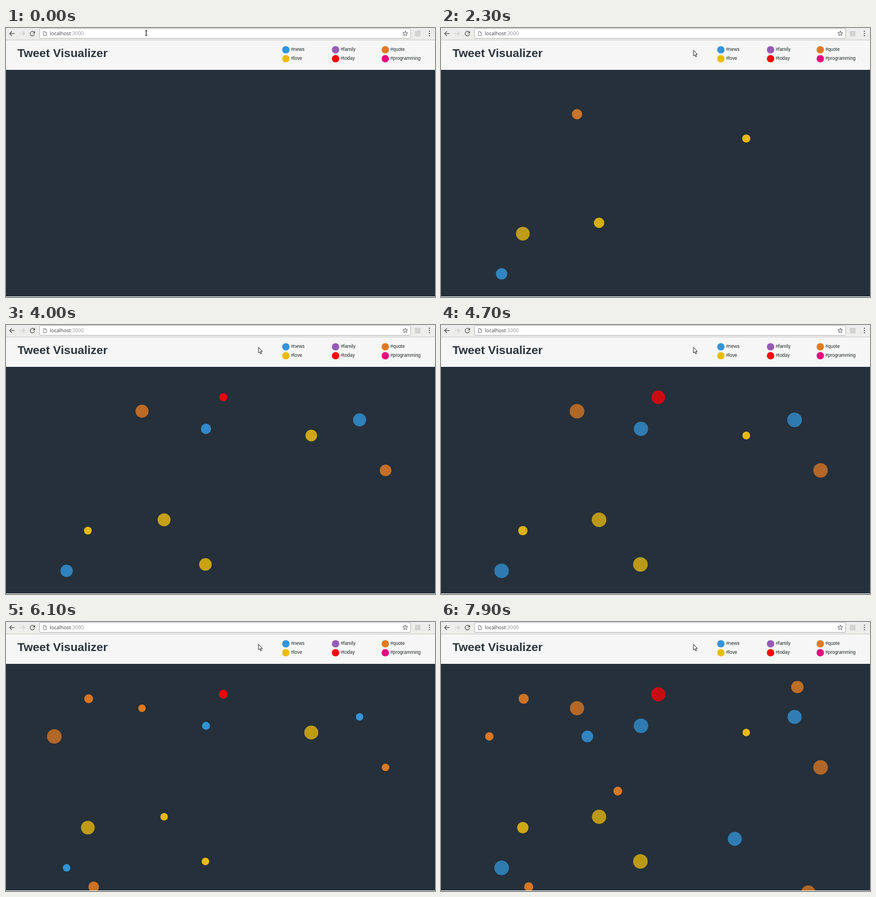
An HTML page with a canvas that plays this animation: 768x482 px, repeating every 8 s.

```html
<!DOCTYPE html>
<html lang="en">
<head>
<meta charset="utf-8">
<title>Tweet Visualizer</title>
<style>
  html, body { margin: 0; width: 100%; height: 100%; overflow: hidden; background: #fff; }
  canvas { display: block; width: 768px; height: 482px; }
</style>
</head>
<body>
<canvas id="stage" width="768" height="482"></canvas>
<script>
const ctx = document.getElementById('stage').getContext('2d');
const LOOP = 8000, STEP = 100, PULSE = 3000;
const SANS = '"Liberation Sans", Arial, sans-serif';

const colors = {
  news: '#3394d8', family: '#955bb3', quote: '#e07a22',
  love: '#ebbb0b', today: '#f80208', programming: '#e8057f'
};

// tag, x, y, time of arrival
const tweets = [
  ['quote', 243.5, 154.5, 280], ['love', 283, 349, 300], ['news', 108.5, 440.5, 400],
  ['love', 146.5, 368.5, 1420], ['love', 546.5, 198, 2130], ['news', 633, 170, 3270],
  ['love', 357, 429, 3370], ['quote', 679.5, 260.5, 3480], ['news', 358, 186, 3630],
  ['today', 389, 129.5, 3850], ['quote', 86.5, 205, 4705], ['quote', 157, 474.5, 5700],
  ['quote', 148, 137.5, 5860], ['quote', 657.5, 485, 6700], ['news', 526, 388.5, 6950],
  ['quote', 638, 116.5, 7290], ['news', 262, 205, 7380], ['quote', 316.5, 303, 7665]
];

// CSS "ease": cubic-bezier(.25, .1, .25, 1)
function ease(x) {
  const at = (s, a, b) => 3 * s * (1 - s) * ((1 - s) * a + s * b) + s ** 3;
  let lo = 0, hi = 1;
  for (let i = 0; i < 20; i++) {
    const mid = (lo + hi) / 2;
    if (at(mid, 0.25, 0.25) < x) lo = mid; else hi = mid;
  }
  return at(lo, 0.1, 1);
}

function swell(age) {
  const p = (age % PULSE) / PULSE * 2;
  return p < 1 ? ease(p) : 1 - ease(p - 1);
}

function rect(x, y, w, h, fill) {
  ctx.fillStyle = fill;
  ctx.fillRect(x, y, w, h);
}

function disc(x, y, r, fill) {
  ctx.fillStyle = fill;
  ctx.beginPath();
  ctx.arc(x, y, r, 0, Math.PI * 2);
  ctx.fill();
}

function text(str, x, y, font, fill) {
  ctx.font = font;
  ctx.fillStyle = fill;
  ctx.fillText(str, x, y);
}

function stroke(points, color, width = 1) {
  ctx.strokeStyle = color;
  ctx.lineWidth = width;
  ctx.beginPath();
  points.forEach(([x, y]) => ctx.lineTo(x, y));
  ctx.stroke();
}

function arrow(x, dir, color) {
  stroke([[x - 4.5, 10], [x + 4.5, 10]], color, 1.3);
  stroke([[x + dir * 0.5, 6], [x + dir * 4.5, 10], [x + dir * 0.5, 14]], color, 1.3);
}

function star(x, y) {
  const points = Array.from({ length: 11 }, (_, i) => {
    const a = i * Math.PI / 5 - Math.PI / 2, r = i % 2 ? 2 : 4.6;
    return [x + r * Math.cos(a), y + r * Math.sin(a)];
  });
  stroke(points, '#5f6163', 1);
}

function toolbar() {
  rect(0, 0, 768, 22, '#ededec');
  rect(0, 21, 768, 1, '#c9c9c8');
  arrow(11, -1, '#56585a');
  arrow(29, 1, '#cfcfcf');

  ctx.strokeStyle = '#56585a';
  ctx.lineWidth = 1.3;
  ctx.beginPath();
  ctx.arc(47.3, 10, 4, 0.3, Math.PI * 1.75);
  ctx.stroke();
  ctx.fillStyle = '#56585a';
  ctx.beginPath();
  ctx.moveTo(52, 5.2);
  ctx.lineTo(52, 9.5);
  ctx.lineTo(47.8, 9.5);
  ctx.fill();

  ctx.beginPath();
  ctx.roundRect(60, 1, 664.5, 17.5, 2);
  ctx.fillStyle = '#fff';
  ctx.fill();
  ctx.strokeStyle = '#b4b4b3';
  ctx.lineWidth = 1;
  ctx.stroke();

  stroke([[67, 6.5], [70.5, 6.5], [72.5, 8.5], [72.5, 13.5], [67, 13.5], [67, 6.2]], '#77797b', 0.9);
  stroke([[70.2, 6.5], [70.2, 8.8], [72.5, 8.8]], '#77797b', 0.8);
  const font = '9px "Open Sans", "Noto Sans", sans-serif';
  text('localhost', 78.5, 13, font, '#3c3e40');
  text(':3000', 78.5 + ctx.measureText('localhost').width, 13, font, '#939597');
  star(714.8, 10);
  rect(732, 5, 10, 10, '#d3d3d2');
  [5.8, 9.8, 13.8].forEach(y => disc(758, y, 1.1, '#56585a'));
}

function header() {
  rect(0, 22, 768, 53, '#f5f6f5');
  text('Tweet Visualizer', 20.5, 51.5, 'bold 21px ' + SANS, '#2b333c');
  [['news', 'love'], ['family', 'today'], ['quote', 'programming']].forEach((pair, col) => {
    const x = 501 + col * 89;
    pair.forEach((tag, row) => {
      const y = 39 + row * 16;
      disc(x, y, 6.6, colors[tag]);
      text('#' + tag, x + 9.2, y + 2 - row * 0.5, '8.4px ' + SANS, '#22262a');
    });
  });
}

function bubbles(t) {
  ctx.save();
  ctx.beginPath();
  ctx.rect(0, 75, 768, 406);
  ctx.clip();
  for (const [tag, x, y, start] of tweets) {
    if (t < start) continue;
    const k = swell(t - start);
    ctx.globalAlpha = 1 - 0.25 * k;
    disc(x, y, 6.6 + 6.5 * k, colors[tag]);
  }
  ctx.restore();
}

function pointer(t) {
  const p = Math.min(1, Math.max(0, (t - 200) / 700));
  const k = p * p * (3 - 2 * p);
  const x = 251 + 198 * k + (t >= 2000 ? 3 : 0), y = 9 + 31 * k;
  if (y < 19) {
    stroke([[x, y - 4], [x, y + 4]], '#333', 1.4);
    stroke([[x - 2, y - 4.3], [x + 2, y - 4.3]], '#333', 1.1);
    stroke([[x - 2, y + 4.3], [x + 2, y + 4.3]], '#333', 1.1);
    return;
  }
  ctx.beginPath();
  [[0, 0], [0, 10], [2.3, 8], [4, 11.8], [5.6, 11], [4, 7.4], [7, 7.2]]
    .forEach(([dx, dy]) => ctx.lineTo(x + dx, y + dy));
  ctx.closePath();
  ctx.fillStyle = '#fff';
  ctx.fill();
  ctx.strokeStyle = '#2a2a2a';
  ctx.lineWidth = 1;
  ctx.stroke();
}

function draw(t) {
  rect(0, 0, 768, 482, '#fafafa');
  rect(0, 75, 768, 406, '#25303b');
  toolbar();
  header();
  bubbles(t);
  pointer(t);
}

const began = performance.now();
function tick() {
  const t = Math.max(0, performance.now() - began) % LOOP;
  draw(Math.floor(t / STEP) * STEP);
  requestAnimationFrame(tick);
}
tick();
</script>
</body>
</html>
```
